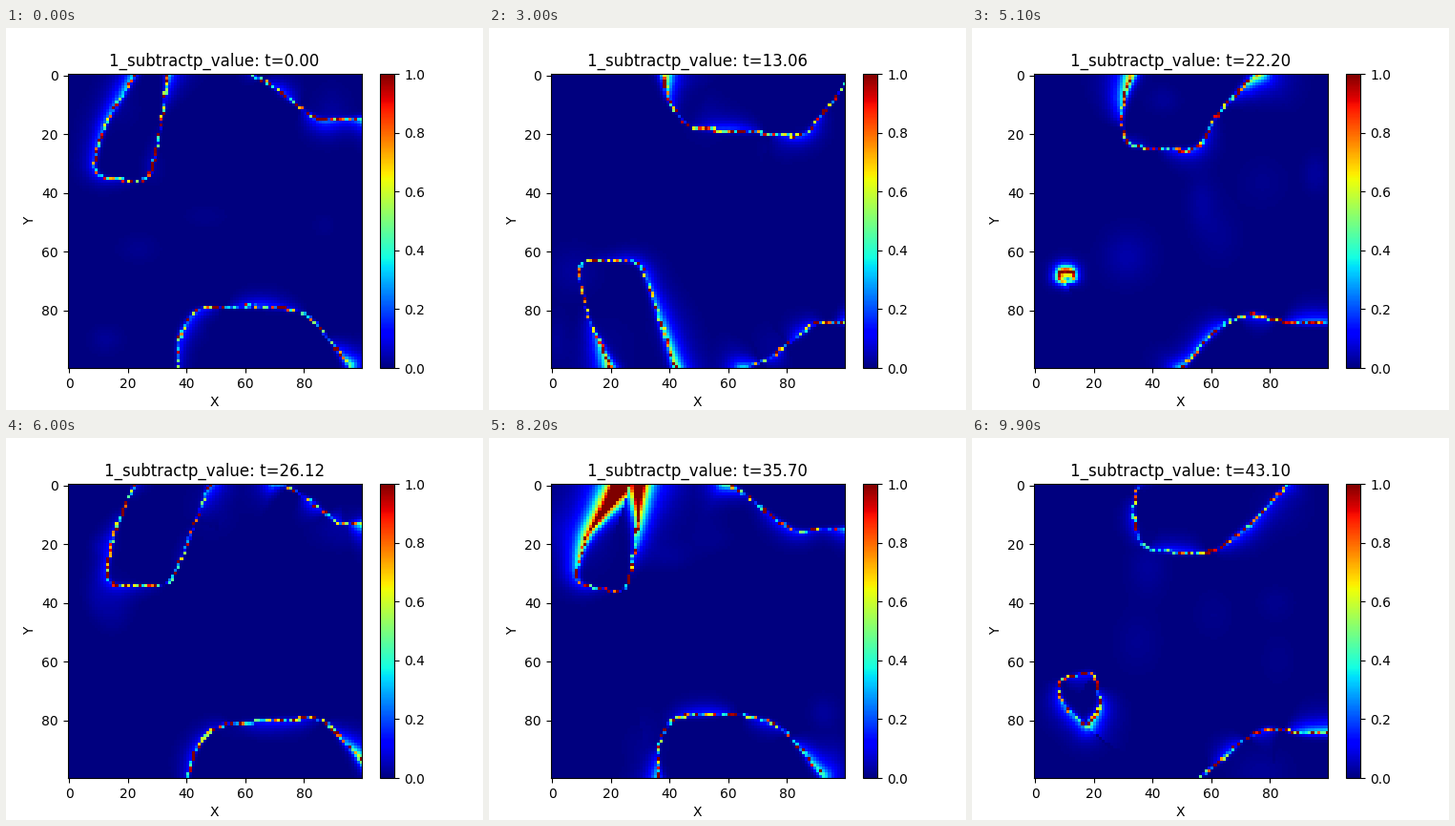
Write a matplotlib script that moves like this. It is 500 px wide and 400 px high and loops after 10000 ms.

```python
import numpy as np
import matplotlib.pyplot as plt
from matplotlib.animation import FuncAnimation

FRAMES = 100
DT = 43.10 / 99
HALF = 5.88        # frames in half a wave period; the field mirrors every half
BIRTH = 51         # frame at which a new wave is born
N = 100            # grid size
SAMPLES = 140
ROUND = 17         # corner rounding, in samples

rows, cols = np.mgrid[0:N, 0:N]
grid = np.column_stack([cols.ravel(), rows.ravel()]).astype(np.float32)
s = np.linspace(0, 1, SAMPLES)

# A wave hangs from the top border. Six handles, left to right, move
# linearly between these poses; ages count half periods.
ring = np.linspace(0, 2 * np.pi, 6)
POSES = {
    0: np.c_[10.5 - 3 * np.sin(ring), 30.7 - 2.2 * np.cos(ring)],
    .23: [(20, 12), (9, 23), (7, 33), (23, 37), (26, 21), (20, 12)],
    .26: [(24, -1), (10, 20), (7, 33), (25, 37), (28, 17), (28, -1)],
    .43: [(20, -1), (12, 17), (8, 36), (30, 36), (35, 21), (42, -1)],
    1: [(33, -1), (29, 10), (30, 24), (55, 26), (63, 11), (76, -1)],
    1.43: [(38, -1), (39, 9), (46, 18), (66, 19), (86, 21), (101, 1)],
    2: [(49, -1), (57, 8), (64, 15), (73, 18), (85, 15), (101, 15)],
    2.43: [(64, -1), (74, 3), (83, 10), (89, 15), (94, 15), (101, 15)],
    3: np.c_[np.linspace(95, 101, 6), np.linspace(-1, 4, 6)],
}
ages = np.array(list(POSES))
poses = np.array([np.array(p, float) for p in POSES.values()])


def outline(age):
    i = np.searchsorted(ages, age, "right") - 1
    w = (age - ages[i]) / (ages[i + 1] - ages[i])
    handles = (1 - w) * poses[i] + w * poses[i + 1]
    dist = np.r_[0, np.cumsum(np.hypot(*np.diff(handles, axis=0).T))]
    box = np.ones(ROUND) / ROUND
    axes = []
    for c in handles.T:
        even = np.interp(s * dist[-1], dist, c)
        even = np.pad(even, ROUND // 2, "reflect", reflect_type="odd")
        axes.append(np.convolve(even, box, "valid"))
    return np.column_stack(axes).astype(np.float32)


def glow_along(age, rng):
    """Signed glow on the outline: > 0 spreads outside, < 0 inside."""
    start, end = rng.normal(.35, .45), rng.normal(.6, .2)
    ends = start * (1 - s) ** 6 + end * s ** 6
    surge = 1 + 2 * np.exp(-((age - .27) / .03) ** 2)   # breaking the border
    ripple = .2 * np.sin(2 * np.pi * (rng.uniform(.8, 2) * s + rng.random()))
    newborn = max(0, 1 - 10 * age)
    return ends * surge + ripple - newborn


def wave(age, rng):
    """Error field of one wave."""
    curve = outline(age)
    glow = glow_along(age, rng)
    d2 = (curve ** 2).sum(1) - 2 * grid @ curve.T
    near = d2.argmin(1)
    tx, ty = np.gradient(curve, axis=0).T
    off = grid - curve[near]
    d = np.hypot(*off.T)
    side = off[:, 1] * tx[near] - off[:, 0] * ty[near]

    g = glow[near]
    amp = np.abs(g)
    halo = amp * (.85 * np.exp(-d / 2.1) + .15 * np.exp(-d / 8)) - .01
    field = np.where(side * g > 0, halo, amp * np.exp(-d / (.4 + .8 * amp)))
    speckle = 1.3 * rng.random(N * N) ** 1.6 + .5 * amp
    field = np.where(d < .55, np.maximum(field, speckle), field)
    return field.reshape(N, N) * min(1, (3 - age) / .3)


def haze(rng):
    """Faint smooth patches in the background."""
    out = np.zeros((N, N))
    for _ in range(7):
        x, y = rng.uniform(0, N, 2)
        sx, sy = rng.uniform(3, 10, 2)
        out += rng.uniform(.01, .03) * np.exp(
            -((cols - x) / sx) ** 2 - ((rows - y) / sy) ** 2)
    return out


def field_at(n):
    rng = np.random.default_rng(n)
    phase = (n - BIRTH) / HALF
    half = int(np.floor(phase))
    age = phase - half
    field = np.maximum(wave(age, rng), wave(age + 2, rng))[::-1]
    field = np.maximum(field, wave(age + 1, rng)) + haze(rng)
    return field[::-1] if half % 2 else field


fig = plt.figure(figsize=(5, 4), dpi=100)
image = plt.imshow(np.zeros((N, N)), cmap="jet", vmin=0, vmax=1)
plt.colorbar()
plt.xlabel("X")
plt.ylabel("Y")
title = plt.title("")


def update(n):
    image.set_data(field_at(n))
    title.set_text(f"1_subtractp_value: t={n * DT:.2f}")
    return image, title


anim = FuncAnimation(fig, update, frames=FRAMES, interval=100,
                     repeat=True, repeat_delay=0)
plt.show()
```
